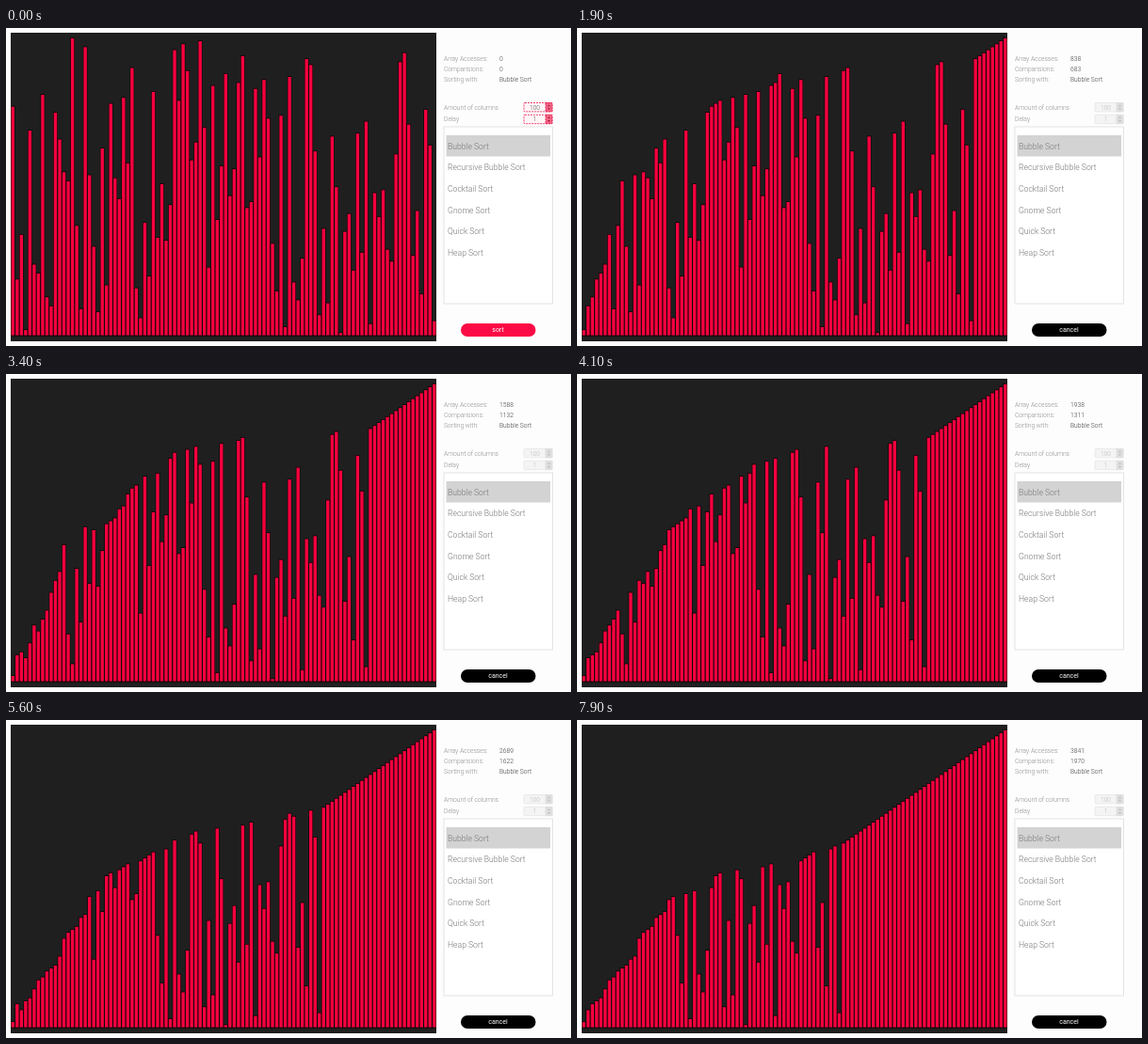
An HTML page with a canvas that plays this animation: 600 px wide and 338 px high, repeating every 8 s.

```html
<!DOCTYPE html>
<html lang="en">
<head>
<meta charset="utf-8">
<title>Sorting visualizer</title>
<style>
html, body { margin: 0; width: 100%; height: 100%; overflow: hidden; background: #fdfdfd; }
canvas, svg { position: absolute; left: 0; top: 0; width: 600px; height: 338px; }
text { font-family: Roboto, sans-serif; font-weight: 300; }
.label { font-size: 6.7px; fill: #8c8c8c; }
.value { font-size: 6.7px; fill: #3c3c3c; }
.item { font-size: 8.6px; fill: #777; }
.spin { font-size: 6.7px; text-anchor: middle; fill: #555; }
.field { fill: #fff5f7; stroke: #e8174d; stroke-width: .8; stroke-dasharray: 2 1; }
.arrows { fill: #f26686; stroke: #e8174d; stroke-width: .8; stroke-dasharray: 2 1; }
.mark { fill: #a51c3e; }
.button { fill: #fc0a45; }
.caption { font-size: 7px; font-weight: 400; fill: #fff; text-anchor: middle; }
.busy .spin { fill: #bbb; }
.busy .field { fill: #f4f4f4; stroke: #e6e6e6; stroke-dasharray: none; }
.busy .arrows { fill: #dedede; stroke: #e0e0e0; stroke-dasharray: none; }
.busy .mark { fill: #bcbcbc; }
.busy .button { fill: #000; }
</style>
</head>
<body>
<canvas id="chart" width="600" height="338"></canvas>
<svg id="panel" viewBox="0 0 600 338">
  <text class="label" x="465" y="35">Array Accesses:</text>
  <text class="label" x="465" y="46">Comparisions:</text>
  <text class="label" x="465" y="57">Sorting with:</text>
  <text class="value" x="524" y="35" id="accesses">0</text>
  <text class="value" x="524" y="46" id="comparisons">0</text>
  <text class="value" x="524" y="57">Bubble Sort</text>
  <text class="label" x="465" y="86.5">Amount of columns</text>
  <text class="label" x="465" y="99.3">Delay</text>
  <g id="spinners"></g>
  <rect x="465" y="105" width="115.5" height="188" fill="#fff" stroke="#e3e3e3"/>
  <rect x="467.5" y="114" width="110.5" height="22.5" fill="#d3d3d3"/>
  <g id="items"></g>
  <rect class="button" x="483" y="314" width="79.5" height="14" rx="7"/>
  <text class="caption" x="522.5" y="323.4" id="caption">sort</text>
</svg>
<script>
const LOOP = 8000, STEP = 100;
const START = [
  77, 19, 34, 2, 69, 24, 21, 81, 13, 10, 75, 66, 55, 52, 100, 37, 9, 97, 54, 30,
  8, 63, 17, 78, 53, 46, 80, 58, 90, 16, 6, 38, 20, 82, 33, 51, 32, 44, 96, 79,
  98, 89, 59, 65, 99, 70, 23, 84, 39, 57, 88, 47, 56, 85, 94, 43, 45, 83, 60, 86,
  73, 31, 15, 74, 3, 87, 18, 12, 26, 93, 91, 62, 7, 36, 11, 67, 50, 1, 35, 41,
  22, 68, 28, 72, 4, 48, 40, 49, 29, 25, 61, 92, 95, 71, 27, 42, 14, 76, 64, 5];
const $ = id => document.getElementById(id);
const ctx = $('chart').getContext('2d');

$('items').innerHTML = ['Bubble', 'Recursive Bubble', 'Cocktail', 'Gnome', 'Quick', 'Heap']
  .map((name, i) => `<text class="item" x="469" y="${128.6 + i * 22.65}">${name} Sort</text>`).join('');

$('spinners').innerHTML = [[79.5, 100], [92.3, 1]].map(([y, value]) => `
  <rect class="field" x="550" y="${y}" width="30" height="9.4" rx="1"/>
  <rect class="arrows" x="573" y="${y}" width="7" height="9.4"/>
  <path class="mark" d="M575 ${y + 3.8}l1.5-1.8 1.5 1.8zM575 ${y + 5.8}l1.5 1.8 1.5-1.8z"/>
  <text class="spin" x="561.5" y="${y + 7}">${value}</text>`).join('');

// Bubble sort stopped after a number of steps; every pass covers the whole array.
function sortFor(steps) {
  const bars = START.slice();
  let swaps = 0;
  for (let s = 0; s < steps; s++) {
    const j = s % (bars.length - 1);
    if (bars[j] > bars[j + 1]) {
      [bars[j], bars[j + 1]] = [bars[j + 1], bars[j]];
      swaps++;
    }
  }
  return { bars, swaps };
}

function drawBars(bars) {
  ctx.fillStyle = '#1f1f1f';
  ctx.fillRect(5, 5, 452, 328);
  bars.forEach((value, i) => {
    const x = 5 + i * 4.52, height = value * 3.165;
    ctx.fillStyle = '#0a0406';
    ctx.fillRect(x, 326.6 - height, 4.52, height + 1);
    ctx.fillStyle = '#f5003e';
    ctx.fillRect(x + .6, 327.4 - height, 3.4, height - .8);
  });
}

let shown = -1;
function frame(now) {
  const tick = Math.floor(now % LOOP / STEP);
  if (tick !== shown) {
    shown = tick;
    const drift = Math.max(0, Math.floor((tick - 32) / 15));
    const steps = Math.max(0, tick * 50 - 112 + drift);
    const { bars, swaps } = sortFor(steps);
    drawBars(bars);
    $('accesses').textContent = steps;
    $('comparisons').textContent = swaps;
    $('panel').classList.toggle('busy', tick > 0);
    $('caption').textContent = tick > 0 ? 'cancel' : 'sort';
  }
  requestAnimationFrame(frame);
}
frame(0);
</script>
</body>
</html>
```
